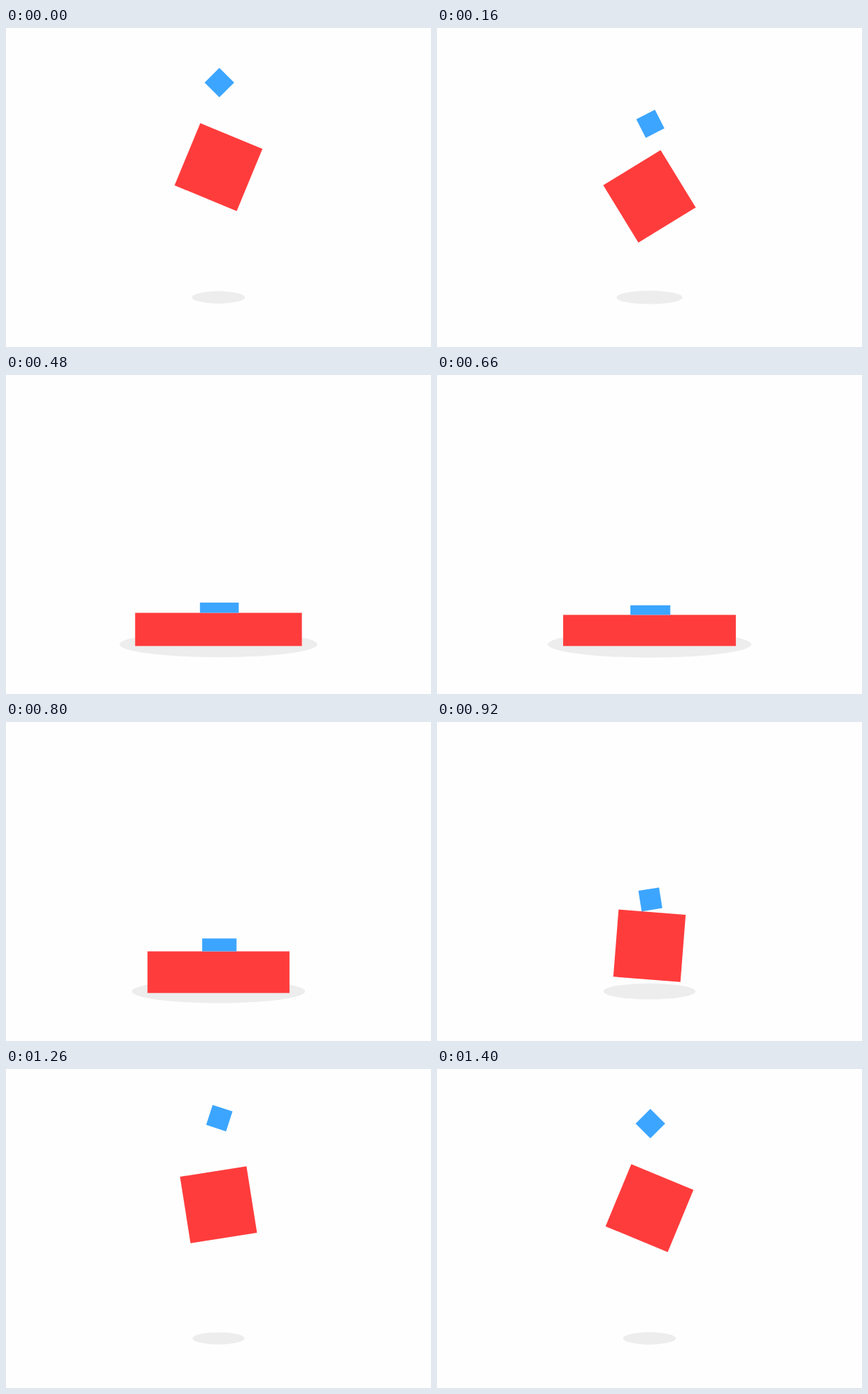
Animation, 600 px wide and 450 px high, one loop 1.42 s. Source, as an HTML page:

```html
<!DOCTYPE html>
<html lang="en">
<head>
<meta charset="utf-8">
<title>Jumping squares</title>
<style>
  html, body { margin: 0; width: 100%; height: 100%; overflow: hidden; background: #fefefe; }
  svg { display: block; width: 100vw; height: 100vh; }
</style>
</head>
<body>
<svg viewBox="0 0 600 450">
  <ellipse id="shadow" cx="300" cy="380" fill="#ededed"/>
  <rect id="big" fill="#ff3c3c"/>
  <rect id="small" fill="#3ca5ff"/>
</svg>
<script>
  const LOOP = 1420, CYCLE = 1400;
  const LAND = 300, JUMP = 900, FLIGHT = 800;
  const GROUND = 382.3, BIG = 95, SMALL = 29.5;
  const [shadow, big, small] = ['shadow', 'big', 'small'].map(id => document.getElementById(id));

  function set(el, attrs) {
    for (const key in attrs) el.setAttribute(key, attrs[key]);
  }

  function box(el, cx, cy, w, h, angle) {
    set(el, {
      x: cx - w / 2, y: cy - h / 2, width: w, height: h,
      transform: `rotate(${angle} ${cx} ${cy})`
    });
  }

  function castShadow(rx) {
    set(shadow, { rx, ry: 8.7 + 0.093 * (rx - 38) });
  }

  // r is the distance in time from the top of the jump, 0 to 1
  const drop = r => 0.6 * r ** 2 + 0.4 * r ** 4;
  const lateDrop = r => 1.4 * r ** 3 - 0.4 * r ** 5;

  function fly(p) {
    const r = Math.abs(2 * p - 1);
    const smallDrop = p < 0.5 ? lateDrop(r) : drop(r);
    const bigY = GROUND - BIG / 2 - 144.2 * (1 - drop(r));
    const smallY = GROUND - BIG - SMALL / 2 - 203.5 * (1 - smallDrop);
    box(big, 300, bigY, BIG, BIG, 180 * p);
    box(small, 301.2, smallY, SMALL, SMALL, -360 * p);
    castShadow(36.7 + 32.8 * r ** 2.8);
  }

  function squash(p) {
    const k = 1 - Math.abs(2 * p - 1) ** 3;
    const bigH = BIG - 51.5 * k, smallH = SMALL - 16.1 * k;
    box(big, 300, GROUND - bigH / 2, BIG + 150 * k, bigH, 0);
    box(small, 301.2, GROUND - bigH - smallH / 2, SMALL + 27 * k, smallH, 0);
    castShadow(69.5 + 75 * k);
  }

  function draw(now) {
    const t = Math.min(now % LOOP, CYCLE);
    if (t >= LAND && t < JUMP) squash((t - LAND) / (JUMP - LAND));
    else fly((t < LAND ? t + CYCLE - JUMP : t - JUMP) / FLIGHT);
  }

  let start;
  function tick(now) {
    start ??= now;
    draw(now - start);
    requestAnimationFrame(tick);
  }
  draw(0);
  requestAnimationFrame(tick);
</script>
</body>
</html>
```
